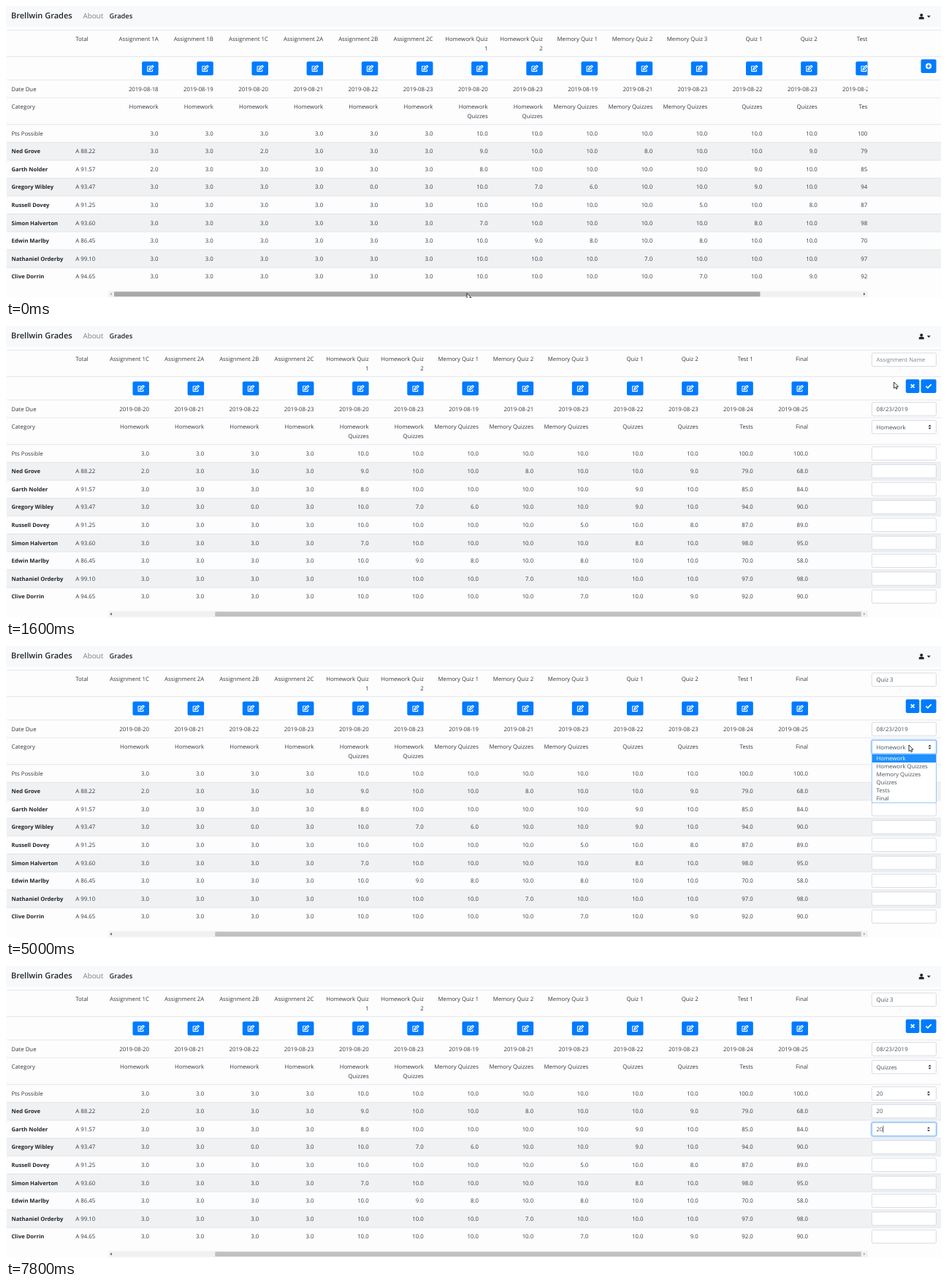
An HTML page that plays this animation: 1280x401 px, repeating every 8000 ms.

```html
<!DOCTYPE html>
<html lang="en">
<head>
<meta charset="utf-8">
<title>Brellwin Grades</title>
<style>
  html, body { margin: 0; width: 100%; height: 100%; overflow: hidden; background: #fdfdfe; }
  svg { display: block; }
  text {
    font: 7.8px "Open Sans", "Noto Sans", sans-serif;
    fill: #32373c;
    text-rendering: geometricPrecision;
    white-space: pre;
  }
  .end { text-anchor: end; }
  .bold { font-size: 7.6px; font-weight: 700; fill: #212529; }
  .brand { font-size: 11px; font-weight: 600; fill: #212529; }
  .nav { font-size: 9.8px; fill: #7d8084; }
  .nav.on { font-size: 9.3px; font-weight: 600; fill: #212529; }
  .field { fill: #495057; }
  .hint { fill: #7b838a; }
  .box { fill: #fff; stroke: #ced4da; stroke-width: .8; }
  .line { stroke: #dee2e6; stroke-width: .8; }
  .btn { fill: #007bff; }
  .icon { fill: none; stroke: #fff; }
</style>
</head>
<body>
<svg id="stage" width="1280" height="401" viewBox="0 0 1280 401">
  <defs>
    <clipPath id="pane"><rect x="140" y="30" width="1039.5" height="360"/></clipPath>
    <g id="edit">
      <rect class="btn" x="-22.5" y="76.3" width="22.5" height="18.9" rx="2"/>
      <path class="icon" stroke-width="1.1" stroke-linejoin="round" d="M-10.4 82.8H-14.9V89.6H-8.1V87"/>
      <path class="icon" stroke-width="1.3" stroke-linejoin="round" d="M-12.7 87.5L-12.3 85.7L-8.2 81.6L-6.7 83.1L-10.8 87.1Z"/>
    </g>
    <path id="updown" fill="#343a40" d="M-2 -.8L0 -3.2L2 -.8ZM-2 .8L0 3.2L2 .8Z"/>
  </defs>
</svg>
<script>
const NS = 'http://www.w3.org/2000/svg';
const stage = document.getElementById('stage');

function add(parent, tag, attrs, content) {
  const el = document.createElementNS(NS, tag);
  for (const key in attrs) el.setAttribute(key, attrs[key]);
  if (content !== undefined) el.textContent = content;
  parent.appendChild(el);
  return el;
}
const set = (el, attrs) => { for (const key in attrs) el.setAttribute(key, attrs[key]); };
const show = (el, on) => el.setAttribute('visibility', on ? 'visible' : 'hidden');
const label = (parent, x, y, content, cls = '') => add(parent, 'text', { x, y, class: cls }, content);
const rect = (parent, x, y, width, height, attrs) => add(parent, 'rect', { x, y, width, height, ...attrs });

const PITCH = 75.17, ROW = 24.57, TOP = 162.7, SHIFT = 163;
const rowMid = k => TOP + ROW * (k + .5);

// Scores differ from full marks only where listed, by column.
const students = [
  ['Ned Grove', '88.22', { 2: 2, 6: 9, 9: 8, 12: 9, 13: 79, 14: 68 }],
  ['Garth Nolder', '91.57', { 0: 2, 6: 8, 11: 9, 13: 85, 14: 84 }],
  ['Gregory Wibley', '93.47', { 4: 0, 7: 7, 8: 6, 11: 9, 13: 94, 14: 90 }],
  ['Russell Dovey', '91.25', { 10: 5, 12: 8, 13: 87, 14: 89 }],
  ['Simon Halverton', '93.60', { 6: 7, 11: 8, 13: 98, 14: 95 }],
  ['Edwin Marlby', '86.45', { 7: 9, 8: 8, 10: 8, 13: 70, 14: 58 }],
  ['Nathaniel Orderby', '99.10', { 9: 7, 13: 97, 14: 98 }],
  ['Clive Dorrin', '94.65', { 10: 7, 12: 9, 13: 92, 14: 90 }]
];

const columns = [];
function group(titles, days, category, points) {
  titles.forEach((title, i) => columns.push({ title, day: days[i], category, points }));
}
group(['1A', '1B', '1C', '2A', '2B', '2C'].map(s => 'Assignment ' + s), [18, 19, 20, 21, 22, 23], 'Homework', 3);
group(['Homework Quiz|1', 'Homework Quiz|2'], [20, 23], 'Homework|Quizzes', 10);
group(['Memory Quiz 1', 'Memory Quiz 2', 'Memory Quiz 3'], [19, 21, 23], 'Memory Quizzes', 10);
group(['Quiz 1', 'Quiz 2'], [22, 23], 'Quizzes', 10);
group(['Test 1'], [24], 'Tests', 100);
group(['Final'], [25], 'Final', 100);

// Page header
rect(stage, 0, 0, 1280, 28, { fill: '#f8f9fb' });
label(stage, 7, 17.1, 'Brellwin Grades', 'brand');
label(stage, 105.5, 16.6, 'About', 'nav');
label(stage, 141.6, 16.5, 'Grades', 'nav on');
add(stage, 'path', { fill: '#212529', d: 'M1249.8 18.2V16.6Q1249.8 14.8 1251.6 14.8H1254.9Q1256.7 14.8 1256.7 16.6V18.2Z' });
add(stage, 'circle', { cx: 1253.2, cy: 12.6, r: 2, fill: '#212529' });
add(stage, 'path', { fill: '#212529', d: 'M1260.8 13.3H1265.8L1263.3 15.9Z' });

// Stripes and rules
for (let k = 1; k < 9; k += 2) rect(stage, 1, TOP + ROW * k, 1279, ROW, { fill: '#eff1f3' });
const rules = [33.2, 69.6, 101.6, 126];
for (let k = 0; k < 9; k++) rules.push(TOP + ROW * k);
rules.forEach(y => add(stage, 'line', { class: 'line', x1: 1, x2: 1280, y1: y, y2: y }));

// Fixed columns
label(stage, 95.3, 48.3, 'Total');
label(stage, 7.5, 116.8, 'Date Due');
label(stage, 7.5, 141.3, 'Category');
label(stage, 7.5, rowMid(0) + 2.8, 'Pts Possible');
students.forEach(([name, total], i) => {
  const y = rowMid(i + 1) + 2.8;
  label(stage, 7.5, y, name, 'bold');
  label(stage, 95.3, y, 'A ' + total);
});

// Scrolling columns
const sheet = add(add(stage, 'g', { 'clip-path': 'url(#pane)' }), 'g', {});
columns.forEach((col, c) => {
  const x = 208.7 + c * PITCH;
  const cell = (y, content) => content.split('|').forEach((part, i) => label(sheet, x, y + i * 12.2, part, 'end'));
  cell(48.3, col.title);
  add(sheet, 'use', { href: '#edit', x });
  cell(116.8, '2019-08-' + col.day);
  cell(141.3, col.category);
  cell(rowMid(0) + 2.8, col.points.toFixed(1));
  students.forEach((s, i) => cell(rowMid(i + 1) + 2.8, (s[2][c] ?? col.points).toFixed(1)));
});

// Scrollbar
rect(stage, 140, 391.5, 1039.5, 8.2, { fill: '#f1f1f1' });
const thumb = rect(stage, 148, 392.4, 884.4, 6.6, {});
const leftArrow = add(stage, 'path', { d: 'M144.7 393.8V397.4L142.5 395.6Z' });
const rightArrow = add(stage, 'path', { d: 'M1174 393.8V397.4L1176.2 395.6Z' });

// Add button
const addButton = add(stage, 'g', {});
rect(addButton, 1252.5, 73.2, 21, 18.8, { rx: 2, class: 'btn' });
add(addButton, 'circle', { cx: 1263, cy: 82.6, r: 4, fill: '#fff' });
add(addButton, 'path', { d: 'M1260.6 82.6H1265.4M1263 80.2V85', stroke: '#007bff', 'stroke-width': 1.3 });

// New assignment form
const LEFT = 1185.3, WIDE = 88.1;
const form = add(stage, 'g', {});
rect(form, 1231.8, 73.2, 18.6, 18.8, { rx: 2, class: 'btn' });
add(form, 'path', { class: 'icon', 'stroke-width': 1.7, d: 'M1238.7 80.2L1243.5 85M1243.5 80.2L1238.7 85' });
rect(form, 1252.5, 73.2, 21, 18.8, { rx: 2, class: 'btn' });
add(form, 'path', { class: 'icon', 'stroke-width': 1.7, d: 'M1259.4 82.7L1261.9 85.1L1266.7 80.1' });

const mids = [46.2, 114.1, 138.7];
for (let k = 0; k < 9; k++) mids.push(rowMid(k));
const fields = mids.map(y => {
  rect(form, LEFT, y - 9.2, WIDE, 18.4, { rx: 2, class: 'box' });
  return label(form, 1191.6, y + 2.8, '', 'field');
});
fields[1].textContent = '08/23/2019';
fields[1].setAttribute('letter-spacing', .18);

const ring = add(form, 'g', {});
rect(ring, LEFT - 1, -10.2, WIDE + 2, 20.4, { rx: 3, fill: 'none', stroke: '#007bff', 'stroke-opacity': .25, 'stroke-width': 1.6 });
rect(ring, LEFT, -9.2, WIDE, 18.4, { rx: 2, fill: 'none', stroke: '#80bdff', 'stroke-width': .9 });
const caret = add(form, 'line', { stroke: '#212529', 'stroke-width': .7 });
add(form, 'use', { href: '#updown', x: 1264.6, y: mids[2] });
const spinners = [3, 4, 5].map(i => add(form, 'use', { href: '#updown', x: 1263, y: mids[i] }));

// Category list
const list = add(stage, 'g', {});
const options = ['Homework', 'Homework Quizzes', 'Memory Quizzes', 'Quizzes', 'Tests', 'Final'];
rect(list, LEFT, 148.6, WIDE, 66.6, { fill: '#fff', stroke: '#80bdff', 'stroke-width': .8 });
const mark = rect(list, LEFT + .4, 0, WIDE - .8, 11, { fill: '#1e90ff' });
const items = options.map((name, i) => label(list, 1191.6, 157.2 + i * 11, name));

const pointer = add(stage, 'path', {
  d: 'M0 0V8.6L1.9 6.9L3.2 9.7L4.6 9L3.4 6.3H6Z', fill: '#fff', stroke: '#000', 'stroke-width': .8
});

// Each step changes part of the state and holds until the next.
const steps = [
  { at: 0, scroll: 0, thumb: '#a8a8a8', cur: [631, 394.5], form: false, focus: -1, open: false, pick: 0,
    name: '', cat: 'Homework', pts: '', s1: '', s2: '', spin: false },
  { at: 200, scroll: 1, thumb: '#787878', cur: [781, 397] },
  { at: 600, thumb: '#c1c1c1', cur: [866, 372] },
  { at: 800, cur: [1050, 240] },
  { at: 1000, cur: [1210, 118] },
  { at: 1200, cur: [1261, 82] },
  { at: 1600, form: true, cur: [1215.6, 77] },
  { at: 1800, cur: [1216, 62] },
  { at: 2000, cur: null },
  { at: 2600, focus: 0 },
  { at: 3200, name: 'Q' },
  { at: 3600, name: 'Qu' },
  { at: 3800, name: 'Quiz' },
  { at: 4000, name: 'Quiz ' },
  { at: 4200, name: 'Quiz 3' },
  { at: 4600, cur: [1228, 92] },
  { at: 4800, cur: [1236, 136] },
  { at: 5000, focus: 2, open: true },
  { at: 5200, pick: 1, cur: [1238, 164] },
  { at: 5600, pick: 3, cur: [1238, 186] },
  { at: 5800, open: false, cat: 'Quizzes' },
  { at: 6000, cur: [1240, 180] },
  { at: 6200, cur: null, spin: true },
  { at: 6600, focus: 3 },
  { at: 6800, pts: '2' },
  { at: 7000, pts: '20' },
  { at: 7200, focus: 4, s1: '2' },
  { at: 7600, s1: '20', focus: 5 },
  { at: 7800, s2: '20' }
];
for (let i = 1; i < steps.length; i++) steps[i] = { ...steps[i - 1], ...steps[i] };

function draw(s) {
  sheet.setAttribute('transform', `translate(${-SHIFT * s.scroll - .1} 0)`);
  set(thumb, { x: 148 + 138.3 * s.scroll, fill: s.thumb });
  leftArrow.setAttribute('fill', s.scroll ? '#404040' : '#a3a3a3');
  rightArrow.setAttribute('fill', s.scroll ? '#a3a3a3' : '#404040');
  show(addButton, !s.form);
  show(form, s.form);

  fields[0].textContent = s.name || 'Assignment Name';
  fields[0].setAttribute('class', s.name ? 'field' : 'hint');
  [s.cat, s.pts, s.s1, s.s2].forEach((value, i) => { fields[i + 2].textContent = value; });

  const on = s.form && s.focus >= 0;
  show(ring, on);
  const typed = [s.name, '', '', s.pts, s.s1, s.s2][s.focus];
  show(caret, on && !!typed);
  if (on) {
    const y = mids[s.focus];
    ring.setAttribute('transform', `translate(0 ${y})`);
    if (typed) {
      const x = 1192 + fields[s.focus].getComputedTextLength();
      set(caret, { x1: x, x2: x, y1: y - 4.8, y2: y + 4.8 });
    }
  }
  spinners.forEach((el, i) => show(el, s.form && (s.focus === i + 3 || (i === 0 && s.spin))));

  show(list, s.open);
  mark.setAttribute('y', 149 + s.pick * 11);
  items.forEach((el, i) => { el.style.fill = i === s.pick ? '#fff' : '#495057'; });

  show(pointer, !!s.cur);
  if (s.cur) pointer.setAttribute('transform', `translate(${s.cur})`);
}

let last = null;
function tick() {
  const t = performance.now() % 8000;
  const step = steps.findLast(s => s.at <= t);
  if (step !== last) draw(last = step);
  requestAnimationFrame(tick);
}
tick();
</script>
</body>
</html>
```
